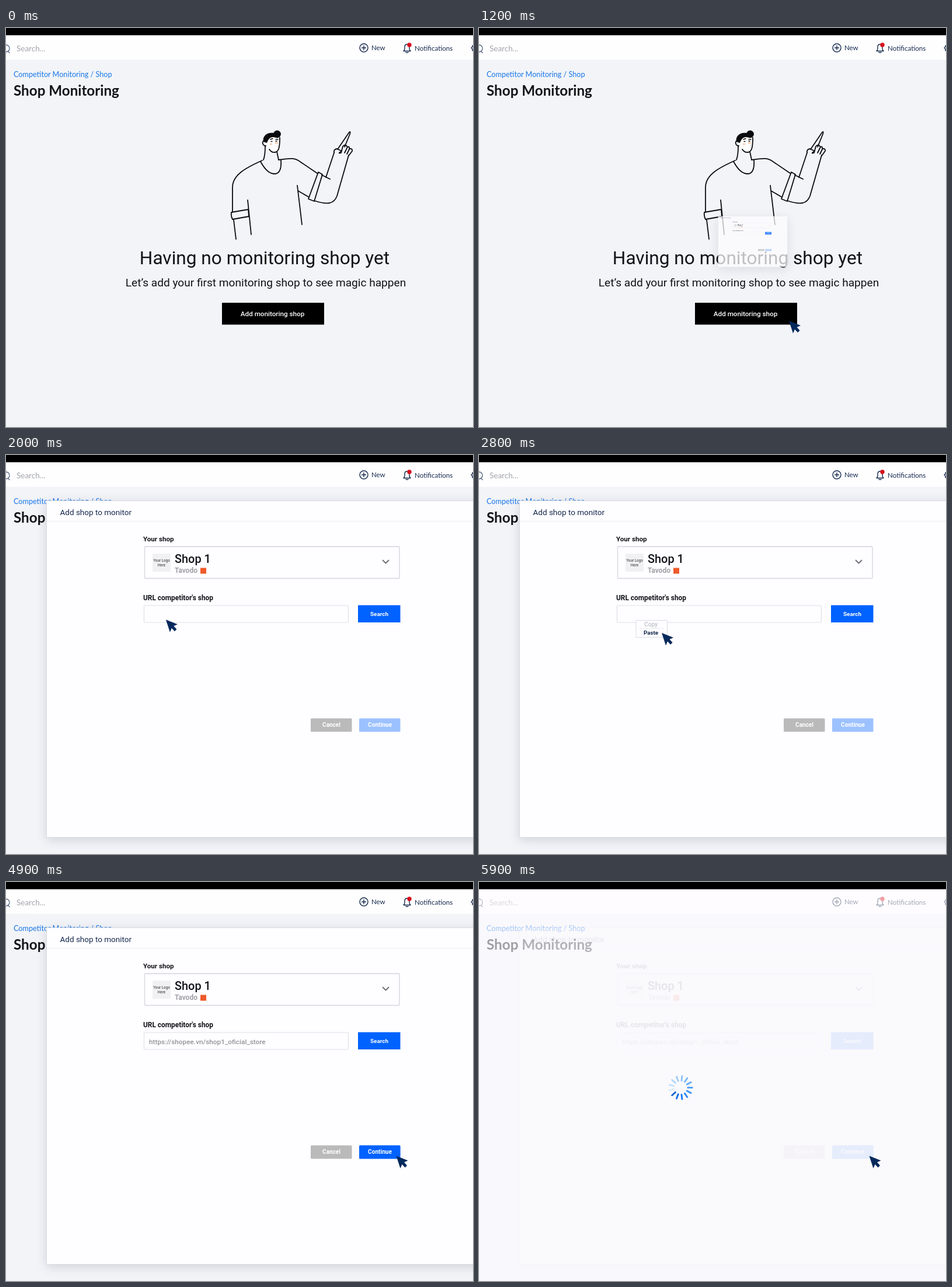
An HTML page that plays this animation: 800x684 px, repeating every 6 s.

```html
<!DOCTYPE html>
<html lang="en">
<head>
<meta charset="utf-8">
<title>Shop Monitoring</title>
<style>
  html, body { margin: 0; width: 100%; height: 100%; overflow: hidden; background: #f2f4f8; }
  svg { display: block; width: 800px; height: 684px; }
  text { font: 500 12px Roboto, sans-serif; fill: #111318; }
  .lato { font-family: Lato, sans-serif; font-weight: 400; }
  .navy { fill: #14294d; }
  .thin { font-weight: 400; }
  .bold { font-weight: 700; }
  .mid { text-anchor: middle; }
  .white { fill: #fff; }
  .gray { fill: #929499; }
  .line { fill: none; stroke: #14294d; stroke-width: 1.4; stroke-linecap: round; stroke-linejoin: round; }
  .ink { fill: none; stroke: #0b0b0d; stroke-width: 1.8; stroke-linecap: round; stroke-linejoin: round; }
  .press { transform-box: fill-box; transform-origin: center; }
  #panel { transform-origin: 470px 366px; }
</style>
</head>
<body>
<svg viewBox="0 0 800 684">
  <rect width="800" height="684" fill="#f2f4f8"/>
  <rect width="800" height="54.5" fill="#fefeff"/>

  <g class="line">
    <path d="M3 39.5l3 3M-6 35a6 6 0 1 0 12 0a6 6 0 1 0-12 0" opacity=".7"/>
    <circle cx="613" cy="34" r="7"/>
    <path d="M609.5 34h7M613 30.5v7"/>
    <path d="M681 39.5q2-1.5 2-4.5v-2.500q0-4.500 4-4.500t4 4.500v2.500q0 3 2 4.500zM685 41.5q2 1.500 4 0"/>
    <path d="M801 29.5l-2 1v2l-2 1.500 2 2v2.500l2 1"/>
  </g>
  <circle cx="691" cy="29" r="3.7" fill="#d8101c"/>
  <text class="lato" x="18" y="39.5" style="font-size:13.5px;fill:#a3a5ab">Search...</text>
  <text class="lato navy" x="626" y="38" style="font-size:11.5px">New</text>
  <text class="lato navy" x="700" y="38.5" style="font-size:11.6px">Notifications</text>
  <text class="lato" x="13" y="84" style="font-size:12.65px;fill:#1877e8">Competitor Monitoring / Shop</text>
  <text class="lato bold" x="13" y="115.5" style="font-size:24.2px">Shop Monitoring</text>

  <g id="empty">
    <path d="M446 192V208L464 213C468 206 469 198 469 186L452 186z" fill="#fff"/>
    <path d="M441 195C439 186 446 178 459 180L462 188C455 185 450 188 447 197z" fill="#0b0b0d"/>
    <circle cx="464.5" cy="182" r="6.4" fill="#0b0b0d"/>
    <path d="M452 199h4M461 197h5" stroke="#f5c19c" stroke-width="2"/>
    <path d="M453 191l4-1.500M462 191h4M454 194.5h2M462 194h2" class="ink" style="stroke-width:1.4"/>
    <g class="ink">
      <path d="M444 194C438 191 438 202 445 202M469 188C469 202 468 212 461 213C456 214 453 211 451 208"/>
      <path d="M444 202C444 213 443 221 441 226M464 212L467 226"/>
      <path d="M436 229C445 245 452 250 461 250C470 249 472 240 471 226"/>
      <path d="M439 227C410 240 388 252 388 273V314M386 316L415 311L416 323L388 328Q385 322 386 316M390 329L394 362M414 295L420 354"/>
      <path d="M467 226C488 223 495 222 505 230L533 249M499 270L507 337M500 279L519 290"/>
      <path d="M535 247L542 251L528 297L518 293Z"/>
      <path d="M528 296C552 304 562 301 567 288L587 218M541 252L555 259M548 256L562 214"/>
      <path d="M568 208L587 180Q591 175 589 182L580 204M562 214Q561 208 567 207L575 211Q567 216 574 214L577 203Q581 198 585 204L580 214M585 204Q589 202 588 208L584 216M588 207Q594 206 593 211L587 219"/>
    </g>
    <text class="mid thin" x="443" y="405" style="font-size:31.6px">Having no monitoring shop yet</text>
    <text class="mid thin" x="445" y="443" style="font-size:19.1px">Let’s add your first monitoring shop to see magic happen</text>
    <rect id="add" class="press" x="370" y="471" width="175" height="37.5"/>
    <text class="mid white" x="456.5" y="493.5" style="font-size:11.7px">Add monitoring shop</text>
  </g>

  <g id="panel">
    <rect id="sheet" x="69.5" y="78.5" width="786" height="577" fill="#fefdff" stroke="#dadbe0"/>
    <path d="M70 113.5h785" stroke="#eeeff3"/>
    <text class="navy thin" x="92.5" y="103" style="font-size:13.5px">Add shop to monitor</text>
    <text class="bold" x="235" y="147.5" style="font-size:11.6px">Your shop</text>
    <rect x="237.5" y="157" width="436.5" height="54.5" rx="2" fill="#fefdff" stroke="#d3d6de" stroke-width="1.3"/>
    <rect x="251" y="169" width="31" height="31" fill="#f1f1f3"/>
    <text class="mid" x="266.5" y="183" style="font-size:6.3px;fill:#555">Your Logo</text>
    <text class="mid" x="266.5" y="191" style="font-size:6.3px;fill:#555">Here</text>
    <text x="289" y="185" style="font-size:19.9px">Shop 1</text>
    <text class="gray" x="289" y="202">Tavodo</text>
    <rect x="333" y="193.5" width="10" height="10" fill="#ee5a2a"/>
    <path d="M645.5 180.5l5 5 5-5" class="line" style="stroke:#6c6e75;stroke-width:1.8"/>
    <text class="bold" x="235" y="249" style="font-size:11.9px">URL competitor's shop</text>
    <rect x="236.5" y="258" width="350" height="29" rx="1.5" fill="#fefdff" stroke="#dfe1e8" stroke-width="1.2"/>
    <text id="url" class="gray" x="245" y="277.5" style="font-size:11.8px">https://shopee.vn/shop1_oficial_store</text>
    <rect id="search" class="press" x="603" y="257.5" width="72.5" height="29.5" fill="#0062ff"/>
    <text class="mid white bold" x="639.5" y="276" style="font-size:9.9px">Search</text>
    <rect x="522" y="451.5" width="70.5" height="23" rx="1.5" fill="#bababb"/>
    <text class="mid white bold" x="557.5" y="465.5" style="font-size:10px">Cancel</text>
    <g class="press" id="continue">
      <rect x="605" y="451.5" width="70.5" height="23" rx="1.5" fill="#9cc1ff"/>
      <rect id="active" x="605" y="451.5" width="70.5" height="23" rx="1.5" fill="#0062ff"/>
    </g>
    <text class="mid white bold" x="640.5" y="465.5" style="font-size:10.1px">Continue</text>
    <g id="menu">
      <rect x="269" y="283.5" width="53.5" height="29" rx="1" fill="#fefdff" stroke="#d8dce6"/>
      <path d="M274 297.5h43" stroke="#e9ebf1"/>
      <text class="mid" x="294.5" y="294" style="font-size:10.1px;fill:#bfc1c7">Copy</text>
      <text class="mid bold navy" x="294.5" y="308" style="font-size:9.8px">Paste</text>
    </g>
  </g>

  <rect id="veil" y="12" width="800" height="672" fill="#fffcff"/>
  <g id="spinner" transform="translate(345.5 352.5)" stroke-width="2.8"></g>
  <g id="cursor">
    <circle id="ripple" r="11.5" fill="#45516f"/>
    <path d="M0 0L20 8L13.5 11L18.5 16.5L15 20L10 14.5L7 21.5Z" fill="#04295c"/>
  </g>
  <rect width="800" height="12.4"/>
</svg>
<script>
const LOOP = 6000, STEP = 100, SPOKES = 13;
const $ = id => document.getElementById(id);
const clamp = v => Math.min(1, Math.max(0, v));
const ramp = (t, from, to) => clamp((t - from) / (to - from));
const ease = p => p < .5 ? 4 * p ** 3 : 1 - 4 * (1 - p) ** 3;
const bump = (t, peak) => Math.cos(Math.PI / 2 * clamp(Math.abs(t - peak) / 180));
const fade = (id, v) => $(id).setAttribute('opacity', v);

// start, end, target x, target y
const moves = [
  [150, 750, 531, 502],
  [1500, 2100, 269, 278],
  [2450, 2800, 313, 305],
  [3100, 3700, 667, 279],
  [4250, 4800, 668.5, 469.5]
];
const clicks = { add: 900, search: 3800, continue: 5300 };
const menuClicks = [2250, 3000];
const allClicks = [...Object.values(clicks), ...menuClicks];

const spokes = Array.from({ length: SPOKES }, (_, i) => {
  const line = document.createElementNS('http://www.w3.org/2000/svg', 'path');
  line.setAttribute('d', 'M11 0H21');
  line.setAttribute('transform', `rotate(${i * 360 / SPOKES})`);
  return $('spinner').appendChild(line);
});

function cursorAt(t) {
  let x = 728, y = 300;
  for (const [from, to, tx, ty] of moves) {
    const p = ease(ramp(t, from, to));
    x += (tx - x) * p;
    y += (ty - y) * p;
  }
  return [x, y];
}

function draw(t) {
  $('cursor').setAttribute('transform', `translate(${cursorAt(t)})`);
  fade('cursor', ramp(t, 50, 250));

  for (const [id, peak] of Object.entries(clicks)) {
    const b = bump(t, peak);
    $(id).style.transform = `scale(${1 - .075 * b})`;
    fade(id, 1 - .08 * b);
  }
  fade('ripple', .5 * Math.max(...allClicks.map(c => bump(t, c))));

  const open = ramp(t, 1082, 1434), leave = ramp(t, 5650, 5950);
  const scale = ease(open), unscale = 1 / Math.max(.1, scale);
  $('panel').style.transform = `scale(${scale})`;
  // the shadow keeps its size while the panel grows
  $('sheet').style.filter = `drop-shadow(0 ${4 * unscale}px ${9 * unscale}px rgba(30, 40, 60, .16))`;
  fade('panel', clamp(open * 2.2) * (1 - .95 * leave));
  fade('empty', t < 1600 ? 1 : 0);
  fade('menu', ramp(t, 2250, 2400) * (1 - ramp(t, 2950, 3100)));
  fade('url', ramp(t, 2950, 3100));
  fade('active', ramp(t, 4150, 4450));

  fade('veil', .72 * leave);
  fade('spinner', clamp(leave * 1.25));
  const head = 5 + Math.round((t - 5900) / STEP);
  spokes.forEach((line, i) => {
    const age = ((head - i) % SPOKES + SPOKES) % SPOKES / (SPOKES - 1);
    line.setAttribute('stroke', `hsl(${214 - 6 * age} 92% ${43 + 49 * age}%)`);
  });
}

function tick(now) {
  draw(Math.floor(now % LOOP / STEP) * STEP);
  requestAnimationFrame(tick);
}
tick(performance.now());
</script>
</body>
</html>
```
